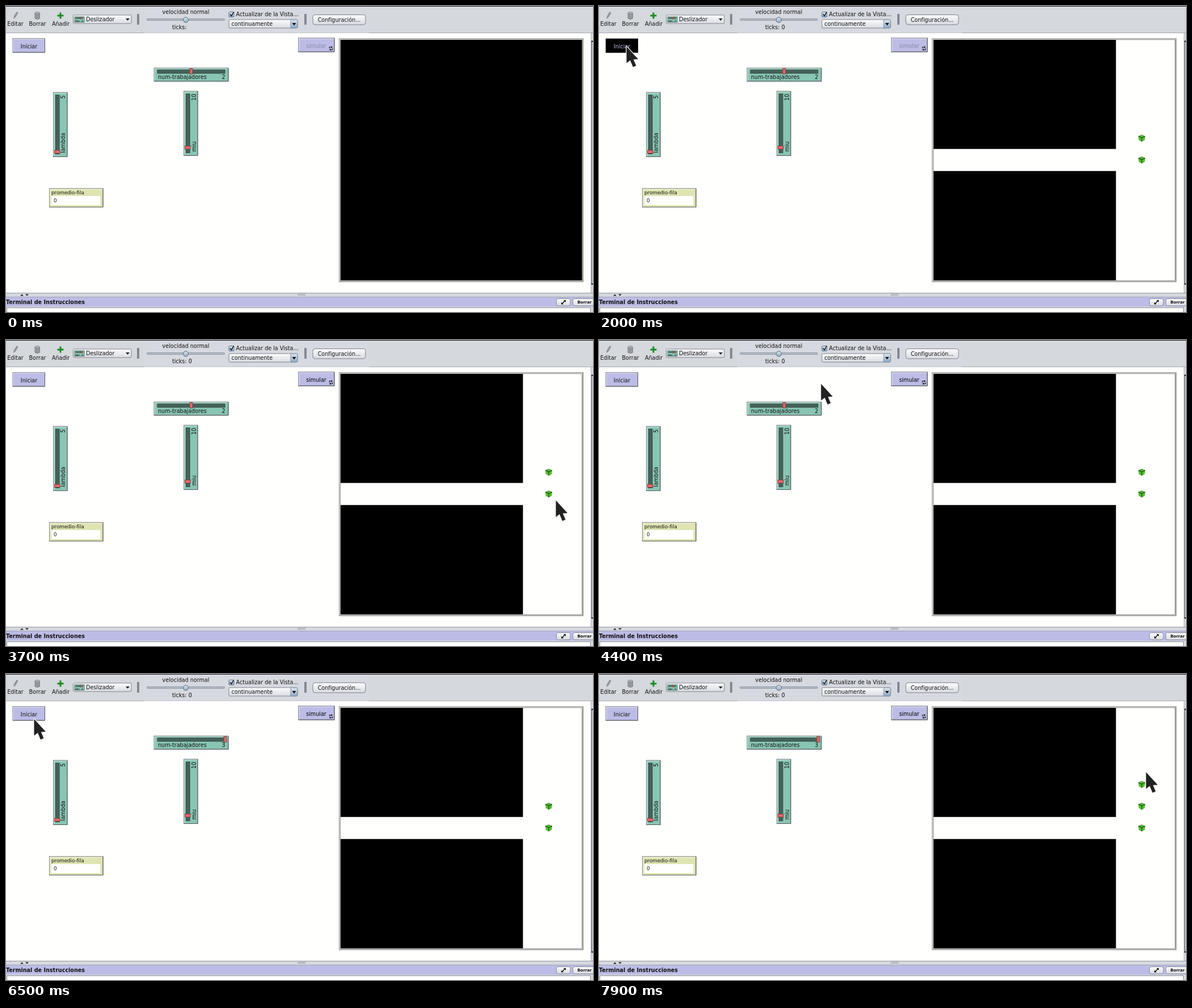
Write an HTML page that moves like this. It is 1035 by 541 pixels and loops after 8000 ms.

```html
<!DOCTYPE html>
<html lang="es">
<head>
<meta charset="utf-8">
<title>Simulación de filas</title>
<style>
html, body { margin: 0; width: 100%; height: 100%; overflow: hidden; background: #fffffe; }
svg { display: block; width: 100%; height: 100%; }
text { font: 9.6px "DejaVu Sans", sans-serif; fill: #111; white-space: pre; }
.mid { text-anchor: middle; }
.end { text-anchor: end; }
.bold { font-weight: bold; }
.small { font-size: 8.7px; }
.tiny { font-size: 7px; }
.track { fill: #46635a; stroke: #2f4740; stroke-width: 1; }
.knob { fill: #e0686b; stroke: #7d3a3c; stroke-width: .9; }
.lilac { fill: #bcbce6; }
.teal { fill: #88c5b3; }
.edge { stroke: #85888a; }
.lit { fill: none; stroke: #fff; stroke-opacity: .6; }
.dim { fill: none; stroke: #55585a; }

/* Every animated part runs on the same 8 s clock and changes in hard steps. */
.anim { animation: 8s step-end infinite; }
#cursor { animation-name: move; }
#pressed { animation-name: press; }
#floor { animation-name: floor; }
#cubes { animation-name: cubes; }
#third { animation-name: late; }
#ticks { animation-name: ticks; }
#ready { animation-name: ready; }
#two { animation-name: two; }
#three { animation-name: three; }
#thumb { animation-name: thumb; }

@keyframes press {
  0% { opacity: 0; } 21.25% { opacity: 1; } 26.25% { opacity: 0; }
  87.5% { opacity: 1; } 90%, 100% { opacity: 0; }
}
@keyframes floor {
  0% { opacity: 0; } 23.75% { opacity: 1; }
  87.5% { opacity: 0; } 90%, 100% { opacity: 1; }
}
@keyframes cubes {
  0% { opacity: 0; } 25% { opacity: 1; }
  87.5% { opacity: 0; } 90%, 100% { opacity: 1; }
}
@keyframes late { 0% { opacity: 0; } 90%, 100% { opacity: 1; } }
@keyframes ticks { 0% { opacity: 0; } 25%, 100% { opacity: 1; } }
@keyframes ready { 0% { opacity: 0; } 26.25%, 100% { opacity: 1; } }
@keyframes two { 0% { opacity: 1; } 71.25%, 100% { opacity: 0; } }
@keyframes three { 0% { opacity: 0; } 71.25%, 100% { opacity: 1; } }
@keyframes thumb { 0% { transform: none; } 71.25%, 100% { transform: translateX(60px); } }
@keyframes move {
  0% { transform: translate(-60px, 0); }
  6.25% { transform: translate(82px, 10px); }
  7.5% { transform: translate(196px, 54px); }
  11.25% { transform: translate(301px, 88px); }
  13.75% { transform: translate(252px, 100px); }
  15% { transform: translate(150px, 94px); }
  16.25% { transform: translate(74px, 78px); }
  17.5% { transform: translate(47px, 69px); }
  31.25% { transform: translate(805px, 243px); }
  33.75% { transform: translate(896px, 238px); }
  35% { transform: translate(935px, 232px); }
  36.25% { transform: translate(946px, 221px); }
  37.5% { transform: translate(962px, 218px); }
  38.75% { transform: translate(974px, 229px); }
  40% { transform: translate(974px, 244px); }
  41.25% { transform: translate(962px, 252px); }
  42.5% { transform: translate(946px, 248px); }
  43.75% { transform: translate(937px, 238px); }
  45% { transform: translate(946px, 264px); }
  46.25% { transform: translate(968px, 281px); }
  47.5% { transform: translate(982px, 268px); }
  48.75% { transform: translate(972px, 243px); }
  50% { transform: translate(949px, 233px); }
  52.5% { transform: translate(720px, 168px); }
  53.75% { transform: translate(500px, 100px); }
  55% { transform: translate(390px, 75px); }
  57.5% { transform: translate(404px, 92px); }
  58.75% { transform: translate(398px, 108px); }
  60% { transform: translate(380px, 116px); }
  61.25% { transform: translate(360px, 119px); }
  62.5% { transform: translate(344px, 118px); }
  63.75% { transform: translate(334px, 117px); }
  65% { transform: translate(329px, 117px); }
  66.25% { transform: translate(327px, 116px); }
  71.25% { transform: translate(366px, 116px); }
  72.5% { transform: translate(400px, 115px); }
  76.25% { transform: translate(270px, 90px); }
  77.5% { transform: translate(119px, 62px); }
  80% { transform: translate(74px, 70px); }
  81.25% { transform: translate(48px, 77px); }
  91.25% { transform: translate(885px, 207px); }
  93.75% { transform: translate(930px, 200px); }
  95% { transform: translate(968px, 196px); }
  96.25% { transform: translate(984px, 188px); }
  97.5% { transform: translate(976px, 178px); }
  98.75%, 100% { transform: translate(963px, 171px); }
}
</style>
</head>
<body>
<svg viewBox="0 0 1035 541" preserveAspectRatio="none">
  <defs>
    <linearGradient id="shine" x2="0" y2="1">
      <stop stop-color="#fbfbfc"/><stop offset="1" stop-color="#d9dce2"/>
    </linearGradient>
    <linearGradient id="blue" x2="0" y2="1">
      <stop stop-color="#dbe4ee"/><stop offset="1" stop-color="#8fa9c4"/>
    </linearGradient>
    <g id="cube">
      <path d="M-6-3.500 0-6 6-3.500 5.300 3 0 6-5.300 3Z" fill="#55bf33"/>
      <path d="M-6-3.500 0-1 6-3.500M0-1V5.500" fill="none" stroke="#143509" stroke-width="1.100"/>
      <path d="M-6-3.500 0-6 6-3.500" fill="none" stroke="#2c6a1a" stroke-width=".6"/>
    </g>
  </defs>

  <!-- toolbar -->
  <rect width="1035" height="48" fill="#d5d8dc"/>
  <rect x="244" width="396" height="48" fill="#d6d9df"/>
  <rect width="1035" height="1" fill="#15171c"/>
  <path d="M0 47.500H244M640 47.500H1035" stroke="#a4a7ad"/>
  <path d="M244 47.500H640" stroke="#c4c7cd"/>
  <path d="M13.500 22 14.500 18 19 10.500 21 12 16.500 20Z" fill="#96989b" stroke="#707276" stroke-width=".6"/>
  <g fill="#96989b" stroke="#74767a" stroke-width=".8">
    <path d="M51 12.500V22Q55 25 59.500 22V12.500Z"/>
    <ellipse cx="55.200" cy="12.500" rx="4.300" ry="1.800" fill="#b4b6b9"/>
  </g>
  <path d="M96 11.500V22.500M90.500 17H101.500" stroke="#1c8a22" stroke-width="3"/>
  <text class="mid" x="16.500" y="35">Editar</text>
  <text class="mid" x="55.500" y="35">Borrar</text>
  <text class="mid" x="96.500" y="35">Añadir</text>

  <rect x="118.500" y="16" width="102.500" height="15" rx="2" fill="url(#shine)" stroke="#80848b"/>
  <rect x="121" y="19" width="17" height="9.500" fill="#88c5b3" stroke="#30584b" stroke-width=".8"/>
  <path d="M122.500 21.500H136" stroke="#33564a" stroke-width="2"/>
  <path d="M131 19.500V23.500" stroke="#c5383d" stroke-width="2"/>
  <text x="122" y="28" style="font-size:4.500px">abc  5</text>
  <text x="141" y="27">Deslizador</text>
  <path d="M211 22H218L214.500 26Z" fill="#222"/>
  <g fill="#85888e">
    <rect x="231" y="14" width="4" height="19"/>
    <rect x="526" y="14" width="4" height="19"/>
  </g>

  <text class="mid" x="317" y="14">velocidad normal</text>
  <rect x="248.500" y="22.500" width="137" height="3" rx="1.500" fill="#b4bac4" stroke="#878e9a" stroke-width=".8"/>
  <circle cx="317" cy="24.500" r="4.600" fill="url(#blue)" stroke="#53687e"/>
  <text x="293" y="41">ticks:</text>
  <text id="ticks" class="anim" x="321.800" y="41">0</text>

  <rect x="393" y="10.500" width="9" height="9" rx="1.500" fill="url(#blue)" stroke="#5d7084"/>
  <path d="M395 14.500 397.500 17.500 401.500 10.500" fill="none" stroke="#111" stroke-width="1.500"/>
  <text x="405.500" y="18">Actualizar de la Vista...</text>
  <rect x="393" y="24" width="121" height="15" rx="2" fill="url(#shine)" stroke="#80848b"/>
  <path d="M502 24H512Q514 24 514 26V37Q514 39 512 39H502Z" fill="url(#blue)" stroke="#71859a" stroke-width=".8"/>
  <path d="M504.500 30H511.500L508 34.500Z" fill="#111"/>
  <text x="397.500" y="34.500">continuamente</text>
  <rect x="541" y="15.500" width="93" height="17.500" rx="4" fill="url(#shine)" stroke="#7d8188"/>
  <text class="mid" x="587.500" y="28">Configuración...</text>

  <!-- buttons -->
  <rect class="lilac edge" x="12" y="57.500" width="56.500" height="24.500"/>
  <path class="lit" d="M13.300 81V58.800H67.500"/>
  <path class="dim" d="M12 82H68.500V58"/>
  <text class="mid" x="40.500" y="74.500">Iniciar</text>
  <g id="pressed" class="anim">
    <rect x="12" y="58" width="57" height="24.500"/>
    <text class="mid" x="40.500" y="74.500" style="fill:#bcbce6">Iniciar</text>
  </g>

  <rect class="lilac edge" x="515.500" y="56.500" width="63.500" height="24.500"/>
  <path class="lit" d="M516.800 80V57.800H578"/>
  <path class="dim" d="M515.500 81H579V57"/>
  <text class="mid" x="547" y="74" style="fill:#8b8baa">simular</text>
  <text id="ready" class="mid anim" x="547" y="74">simular</text>
  <path d="M570.300 75V72.800H574M575.700 75V77.200H572" fill="none" stroke="#111" stroke-width="1.100"/>
  <path d="M573.500 70.800 576 72.800 573.500 74.800ZM572.500 75.200 570 77.200 572.500 79.200Z" fill="#111"/>

  <!-- sliders -->
  <g class="edge">
    <rect class="teal" x="261" y="109.500" width="131" height="23.500"/>
    <rect class="teal" x="83.500" y="152.500" width="24.500" height="114"/>
    <rect class="teal" x="313.500" y="150.500" width="24.500" height="114"/>
  </g>
  <path class="lit" d="M262.300 132V110.800H391M84.800 265.500V153.800H107M314.800 263.500V151.800H337"/>
  <path class="dim" d="M261 133H392V110M83.500 266.500H108V153M313.500 264.500H338V151"/>
  <rect class="track" x="267" y="113" width="119" height="6"/>
  <text x="268" y="129">num-trabajadores</text>
  <text id="two" class="end anim" x="386.500" y="129">2</text>
  <text id="three" class="end anim" x="386.500" y="129">3</text>
  <rect id="thumb" class="knob anim" x="324" y="110.800" width="5" height="9.500"/>

  <rect class="track" x="87.500" y="157.500" width="6.500" height="104"/>
  <rect class="knob" x="85.500" y="255" width="9.500" height="5.500"/>
  <text transform="translate(104 260) rotate(-90)">lambda</text>
  <text transform="translate(104 164) rotate(-90)">5</text>

  <rect class="track" x="317.500" y="155.500" width="6.500" height="104"/>
  <rect class="knob" x="315.500" y="247.500" width="9.500" height="5.500"/>
  <text transform="translate(334.500 257.500) rotate(-90)">miu</text>
  <text transform="translate(334.500 167.500) rotate(-90)">10</text>

  <!-- monitor -->
  <rect class="edge" x="76.500" y="322.500" width="94.500" height="33" fill="#dfe4b2"/>
  <path class="lit" d="M77.800 354.500V323.800H170"/>
  <path class="dim" d="M76.500 355.500H171V323"/>
  <rect x="80" y="336" width="86.500" height="16" fill="#fffffe"/>
  <text class="small" x="80" y="333">promedio-fila</text>
  <text class="small" x="84" y="347">0</text>

  <!-- world view -->
  <rect x="587.500" y="57.500" width="430" height="430" fill="#ececea" stroke="#8c8e8b"/>
  <path class="dim" d="M587.500 487.500H1017.500V57.500" stroke-opacity=".6"/>
  <rect x="589.500" y="59.500" width="426.500" height="426" stroke="#8c8e8b"/>
  <path id="floor" class="anim" d="M911.500 60H1015.500V485H911.500V291.700H590V252.700H911.500Z" fill="#fffffe"/>
  <g id="cubes" class="anim">
    <use href="#cube" x="957" y="234"/>
    <use href="#cube" x="957" y="272.500"/>
    <use id="third" class="anim" href="#cube" x="957" y="195.500"/>
  </g>

  <!-- scroll bar and terminal -->
  <rect x="1031" y="48" width="4" height="459" fill="#d6d9df"/>
  <path d="M1031.500 48V507" stroke="#aeb1b7"/>
  <path d="M1035 62.500H1032.500V491.500H1035" fill="#bfc4cc" stroke="#6a6f77"/>
  <path d="M1032 62.500H1035M1032 491.500H1035" stroke="#222" stroke-width="2"/>
  <rect y="507" width="1035" height="34" fill="#d6d9df"/>
  <path d="M0 507.500H1035" stroke="#92959b"/>
  <path d="M25 512.500H31L28 509.500ZM34 509.500H40L37 512.500Z" fill="#222"/>
  <path d="M514 509.500H528M514 511.500H528" stroke="#92959b" stroke-width=".8"/>
  <rect class="lilac" y="515" width="1035" height="16.500"/>
  <path d="M0 514.500H1035" stroke="#a2a4b2"/>
  <text class="bold" x="0" y="527">Terminal de Instrucciones</text>
  <g fill="url(#shine)" stroke="#878b98">
    <rect x="970.500" y="517.500" width="24.500" height="12.500" rx="3"/>
    <rect x="999.500" y="517.500" width="40" height="12.500" rx="3"/>
  </g>
  <path d="M980.500 526.500 985.500 521" stroke="#111" stroke-width="1.400"/>
  <path d="M983 520H987V524ZM979 523.500V527.500H983Z" fill="#111"/>
  <text class="bold tiny" x="1007.500" y="526">Borrar</text>
  <rect x="1.500" y="533.500" width="1029" height="12" fill="#fffffe" stroke="#8d9096"/>

  <path id="cursor" class="anim" d="M1.500 2.500V32L8 27 13 39 18.500 36.500 13.800 25.500 22 25Z"
        fill="#222" stroke="#fff" stroke-width="2.400" stroke-linejoin="round" paint-order="stroke"/>
</svg>
</body>
</html>
```
